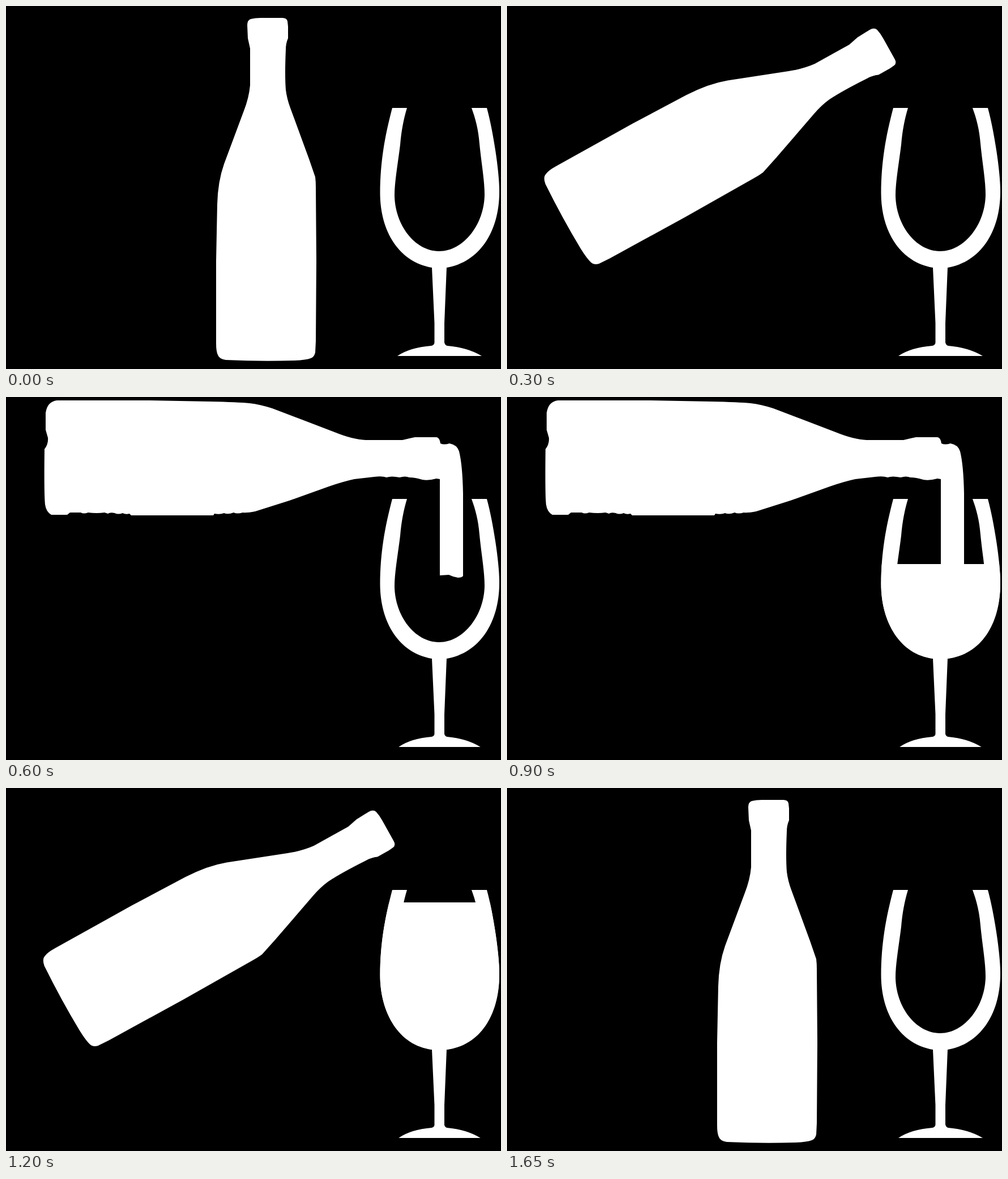
An HTML page for the animation above (1800 ms loop, 874x641 px).

```html
<!DOCTYPE html>
<html lang="en">
<head>
<meta charset="utf-8">
<title>Pouring wine</title>
<style>
  html, body { margin: 0; width: 100%; height: 100%; overflow: hidden; background: #000; }
  svg { display: block; width: 874px; height: 641px; fill: #fff; }
</style>
</head>
<body>
<svg viewBox="0 0 874 641">
  <defs>
    <clipPath id="bowl">
      <path d="M682 180C671 222 660.5 270 660.5 330C660.5 398 694 455 752 462H778C836 455 871 402 871 330C871 292 860 220 849 180Z"/>
    </clipPath>
  </defs>

  <!-- Bottle, origin at the middle of its base -->
  <path id="bottle" d="M-34 -588Q-34 -597 -28 -599Q-20 -601 -10 -601H28Q36 -601 37 -595L38 -586V-565Q34 -556 34 -545
    Q32 -500 34 -474Q36 -458 42 -442L75 -352L86 -320Q87 -312 87 -302L88 -172L87 -30L86 -10Q84 -2 78 0Q70 3 50 4
    Q-10 6 -72 3Q-84 1 -86 -6Q-89 -12 -89 -26V-172L-87 -272Q-86 -312 -75 -343L-40 -437Q-31 -460 -29 -482V-547L-33 -565Z"/>

  <!-- Level bottle with its stream -->
  <path id="pour" d="M90 6H250L360 8Q410 9 430 11Q448 13 470 20L520 39L580 62Q612 75 635 76H700Q712 73 722 71H760
    Q766 72 767 82Q773 85 783 82Q796 84 800 96Q806 120 807 170V316Q805 319 798 319Q790 318 782 314L766 315V145L760 144
    Q746 148 735 146Q722 142 712 142Q705 139 695 142Q680 139 672 142Q664 139 650 141L615 145Q596 149 570 158L500 183
    L440 202Q425 205 418 204Q408 207 402 204Q392 208 385 205Q378 208 368 206L366 209H221L218 206Q211 208 206 205
    Q198 208 192 205Q184 203 180 206L174 204Q160 206 145 204Q137 207 132 204H113L108 208H80Q71 203 69 190Q67 170 68 92
    Q75 83 74 72L70 58V28Q73 8 90 6Z"/>

  <!-- Glass -->
  <path d="M682 180H708C702 200 698 220 696 245C692 278 686 310 686 335C687 387 722 433 765 433C808 433 845 385 845 332
    C845 308 839 275 836 243C834 218 829 199 822 180H849C860 220 871 292 871 325C872 398 836 452 778 462L774 560V600H756.5V560
    L752 462C694 452 660.5 398 660.5 330C660.5 270 671 222 682 180Z"/>
  <path id="foot" d="M-8 -24Q-9 -19 -14 -18Q-52 -15 -74 0H75Q50 -15 14 -18Q10 -19 9 -24Z"/>
  <g clip-path="url(#bowl)"><rect id="wine" x="655" width="220" height="0"/></g>
</svg>
<script>
const STEP = 150;
const EMPTY = 462;
const part = id => document.getElementById(id);
const bottle = part('bottle'), pour = part('pour'), foot = part('foot'), wine = part('wine');

// Base x, base y, angle, scale
const upright = [460, 622, 0, 1];
const lean = [354, 595, 23.6, 1];
const tilt = [108, 380, 60.9, 1.07];
const steep = [58, 213, 77, 1.1];

// Bottle pose (null while pouring), wine surface, foot scale
const steps = [
  [upright, EMPTY, 1],
  [lean, EMPTY, 1],
  [tilt, EMPTY, 1],
  [steep, EMPTY, .97],
  [null, EMPTY, .97],
  [null, 371, .97],
  [null, 295, .97],
  [steep, 202, .97],
  [tilt, 202, .97],
  [lean, 293, .97],
  [upright, 371, .97],
  [upright, EMPTY, 1]
];

function show([pose, level, footScale]) {
  bottle.style.display = pose ? '' : 'none';
  pour.style.display = pose ? 'none' : '';
  if (pose) {
    const [x, y, angle, scale] = pose;
    bottle.setAttribute('transform', `translate(${x} ${y}) rotate(${angle}) scale(${scale})`);
  }
  foot.setAttribute('transform', `translate(765 618) scale(${footScale} 1)`);
  wine.setAttribute('y', level);
  wine.setAttribute('height', EMPTY - level);
}

const start = performance.now();
function tick() {
  const t = performance.now() - start;
  show(steps[Math.floor(t / STEP) % steps.length]);
  requestAnimationFrame(tick);
}
tick();
</script>
</body>
</html>
```
